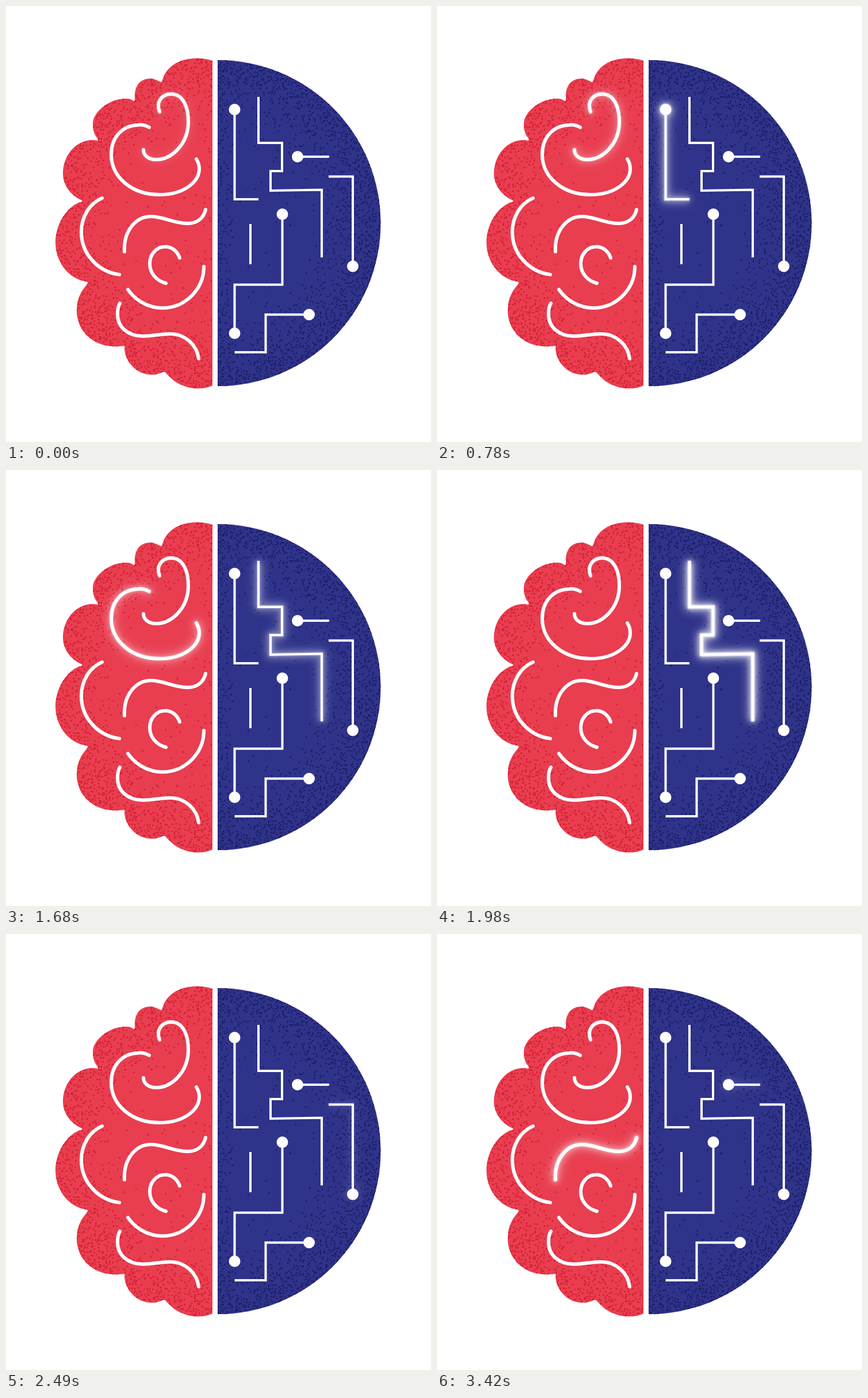
An HTML page with a canvas that plays this animation: 739 px wide and 758 px high, repeating every 3.45 s.

```html
<!DOCTYPE html>
<html lang="en">
<head>
<meta charset="utf-8">
<title>Two-sided brain</title>
<style>
  html, body { margin: 0; width: 100%; height: 100%; overflow: hidden; background: #fff; }
  canvas { display: block; }
</style>
</head>
<body>
<canvas id="stage"></canvas>
<script>
const W = 739, H = 758, LOOP = 3450, PULSE = 900;
const CX = 363, CY = 377.5, R = 283.5;

const brain = new Path2D(`M359 95 C330 86 283 90 272 129 C271 133 268 133 266 131
  C250 120 222 127 224 160 C225 165 222 167 219 163 C197 154 151 176 151 206
  C151 217 154 224 159 230 C161 234 158 235 154 233 C122 231 99 260 99 291
  C99 312 113 329 130 337 C134 339 133 341 129 341 C104 350 86 381 86 411
  C86 444 108 474 139 479 C143 480 143 482 140 485 C129 497 123 512 123 530
  C123 565 154 598 203 591 C206 590 207 592 206 596 C208 625 238 651 272 637
  C275 635 277 636 280 640 C300 664 334 671 359 660 Z`);

const chip = new Path2D(`M368 94 A${R} ${R} 0 0 1 368 661 Z`);

const fold = (d, start) => ({ path: new Path2D(d), width: 6, cap: 'round', dots: [], start });
const wire = (d, dots, start) => ({ path: new Path2D(d), width: 4, cap: 'butt', dots, start });

// A line with a start time lights up once per loop.
const lines = [
  fold('M267 184 C260 166 272 153 287 153 C308 153 317 176 317 201 C317 240 288 267 261 267 C247 267 239 259 239 250', -30),
  fold('M249 211 C242 207 234 206 228 207 C200 209 183 230 183 258 C183 297 218 328 267 328 C309 328 336 306 336 283 C336 276 334 271 331 266', 900),
  fold('M206 427 C204 392 225 366 252 366 C274 366 292 378 316 378 C333 378 344 368 347 354', 2680),
  fold('M167 334 C145 343 131 367 131 393 C131 431 160 462 197 467'),
  fold('M302 438 C298 426 288 418.5 277 418.5 C262 418.5 250 431 250 448 C250 465 262 478 278 482'),
  fold('M212 493 C226 513 248 525 272 525 C312 525 344 492 344 453'),
  fold('M198 517 C196 520 194 528 194 536 C194 559 213 574 238 574 C257 574 266 570 286 570 C311 570 332 589 335 613'),
  wire('M397.5 180 V336 H439', [[397.5, 180]], 600),
  wire('M439 158 V238 H480 V287 H460 V321 L549 319.5 V437', [], 1530),
  wire('M561 296.5 H603 V452', [[603, 452.5]], 2460),
  wire('M507 262 H562', [[507, 262]], 3390),
  wire('M425 379 V449', []),
  wire('M480.5 362 V484.5 H397.5 V569', [[480.5, 362], [397.5, 569]]),
  wire('M397.5 602 H451.5 V536.5 H527', [[527, 536.5]]),
];

function layer(canvas = document.createElement('canvas')) {
  canvas.width = W;
  canvas.height = H;
  return canvas.getContext('2d');
}

function drawLine(ctx, { path, width, cap, dots }, extra = 0) {
  ctx.strokeStyle = ctx.fillStyle = '#fff';
  ctx.lineWidth = width + extra;
  ctx.lineCap = cap;
  ctx.stroke(path);
  for (const [x, y] of dots) {
    ctx.beginPath();
    ctx.arc(x, y, 10 + extra / 2, 0, 7);
    ctx.fill();
  }
}

let seed = 7;
function random() {
  seed = (seed * 16807) % 2147483647;
  return seed / 2147483647;
}

// Jittered grid of specks, denser towards the rim.
function drawHalf(ctx, shape, color, speck, left, right, seam) {
  ctx.fillStyle = color;
  ctx.fill(shape);
  ctx.save();
  ctx.clip(shape);
  ctx.fillStyle = speck;
  const step = 5;
  for (let gy = 88; gy < 668; gy += step) {
    for (let gx = left; gx < right; gx += step) {
      const x = gx + random() * step, y = gy + random() * step;
      const rim = Math.max(0, (Math.hypot(x - CX, y - CY) - 160) / 120);
      const edge = seam * Math.max(0, 1 - Math.abs(x - CX) / 34);
      if (random() > 0.025 + 0.8 * rim ** 1.5 + edge) continue;
      ctx.beginPath();
      ctx.ellipse(x, y, 1.3 + random() * 0.6, 1.2 + random() * 0.4, random() * 3, 0, 7);
      ctx.fill();
    }
  }
  ctx.restore();
}

function makeGlow(line) {
  const ctx = layer();
  for (const [blur, extra, alpha] of [[9, 9, 0.55], [5, 4, 0.8], [1.2, 2, 1]]) {
    ctx.filter = `blur(${blur}px)`;
    ctx.globalAlpha = alpha;
    drawLine(ctx, line, extra);
  }
  return { image: ctx.canvas, start: line.start };
}

const base = layer();
base.fillStyle = '#fff';
base.fillRect(0, 0, W, H);
drawHalf(base, brain, '#e83e50', '#d51f33', 84, 360, 0.1);
drawHalf(base, chip, '#2f3389', '#1d1d68', 367, 648, 0.6);
lines.forEach(line => drawLine(base, line));

const glows = lines.filter(line => line.start !== undefined).map(makeGlow);
const stage = layer(document.getElementById('stage'));

function render() {
  const time = performance.now() % LOOP;
  stage.globalAlpha = 1;
  stage.drawImage(base.canvas, 0, 0);
  for (const { image, start } of glows) {
    const phase = (time - start) / PULSE;
    if (phase <= 0 || phase >= 1) continue;
    stage.globalAlpha = Math.sin(Math.PI * phase);
    stage.drawImage(image, 0, 0);
  }
  requestAnimationFrame(render);
}
render();
</script>
</body>
</html>
```
